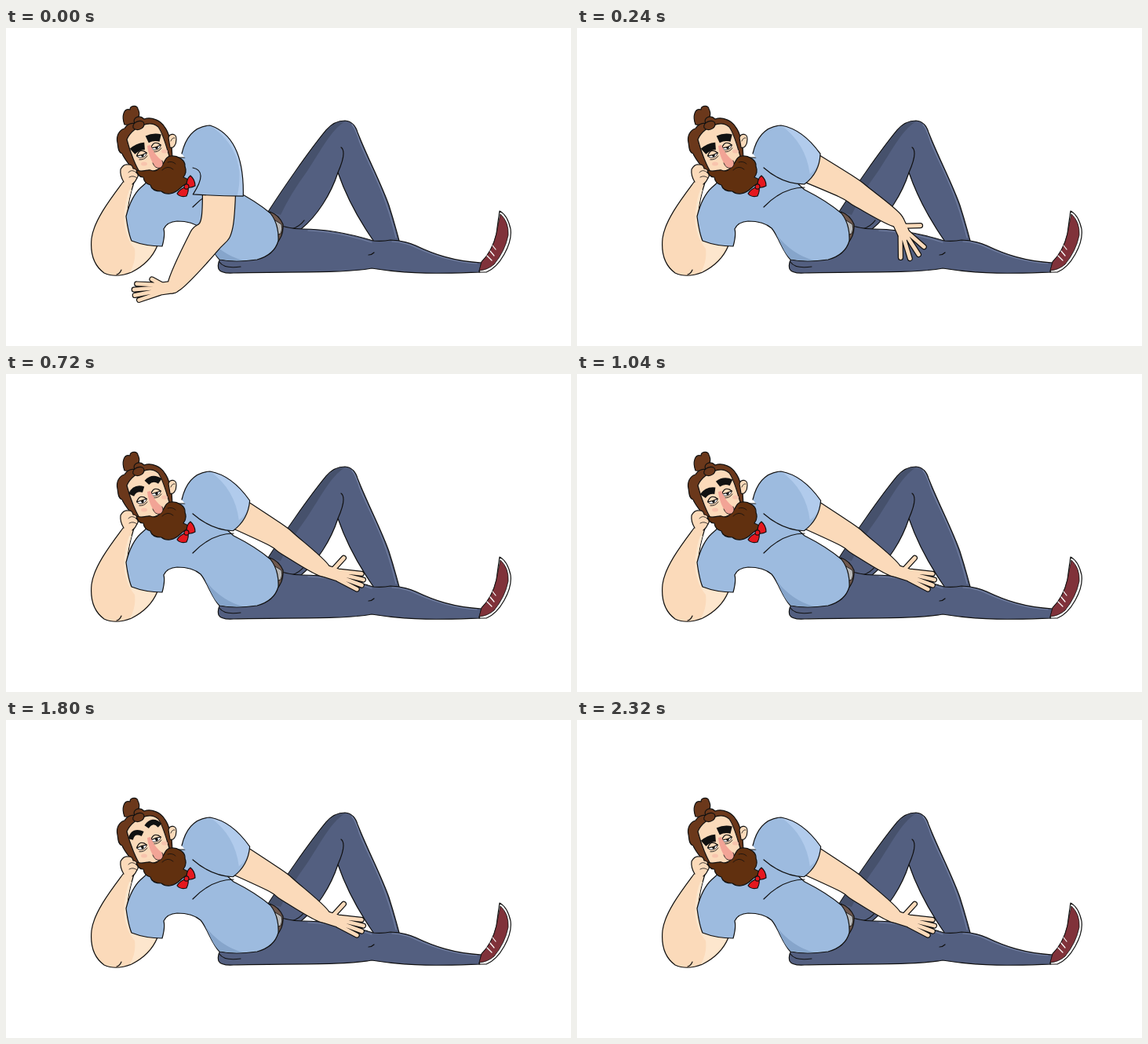
An HTML page that plays this animation: 720 by 405 pixels, repeating every 2.84 s.

```html
<!DOCTYPE html>
<html lang="en">
<head>
<meta charset="utf-8">
<title>Lounging man</title>
<style>
  html, body { margin: 0; width: 100%; height: 100%; overflow: hidden; background: #fff; }
  svg { display: block; width: 720px; height: 405px; }
  path, ellipse { stroke: #111; stroke-width: 1.2; stroke-linejoin: round; stroke-linecap: round; }
  .plain path, .plain ellipse, path.plain { stroke: none; }
  path.line { fill: none; }
  .thin { stroke-width: .8; }
  .denim { fill: #535f80; }
  .skin { fill: #fbdaba; }
  .pale { fill: #fde6cd; }
  .shirt { fill: #9dbbdf; }
  .light { fill: #b1cbec; }
  .hair { fill: #6b381b; }
  .beard { fill: #61300f; }
  .red { fill: #e5181f; }
  path.glow { fill: none; stroke: #7481a3; }
  path.hand { fill: none; stroke: #fbdaba; }
  path.rim { fill: none; stroke: #111; }
  path.brow { fill: none; stroke-linecap: butt; }
</style>
</head>
<body>
<svg viewBox="0 0 720 405">
  <defs>
    <g id="eye">
      <ellipse rx="6.3" ry="4" fill="#fff" class="thin"/>
      <ellipse cx=".5" cy="1.4" rx="1.2" ry="1.4" fill="#111"/>
      <path id="lid" class="skin"/>
      <path class="line thin" d="M-5,5.5Q1,8 6,4"/>
    </g>
    <path id="brow" class="brow"/>
  </defs>

  <!-- legs -->
  <path class="denim" d="M334,234C352,206 385,158 408,130Q418,118 432,118Q444,119 448,133C462,168 478,198 488,226Q495,248 501,271L469,272C455,252 436,222 423,184C414,212 396,240 376,256L350,262Q344,246 334,234Z"/>
  <path class="plain" fill="#46516c" d="M335,234C352,207 385,159 408,131Q418,119 432,119C414,130 402,155 384,182Q362,212 350,238Z"/>
  <path class="line" d="M423,184Q430,168 430,160Q430,154 427,152M380,245Q374,253 364,256"/>
  <path class="glow" d="M441,123Q446,129 451,146C466,182 482,205 497,267"/>
  <path class="denim" d="M345,250Q362,256 378,256C410,256 445,264 468,271Q480,272 490,270Q505,270 522,277C545,288 570,297 606,299L604,311C570,312 520,315 466,306C430,313 350,310 290,312Q274,313 271,307Q269,300 273,294Z"/>
  <path class="glow" d="M385,258C415,259 440,265 466,273M492,272Q506,272 521,279C545,290 570,298 600,300"/>
  <path class="line" d="M462,289Q466,289 469,286M272,298Q278,307 299,304"/>

  <!-- shoe -->
  <path fill="#fff" d="M603,311L606,298Q620,284 625,262Q627,246 629,233Q639,238 643,256Q645,270 635,288Q625,306 612,311Z"/>
  <path fill="#80323a" class="thin" d="M603,309L606,298Q620,284 625,262Q627,250 630,237Q641,247 640,264Q636,284 622,301Q614,308 603,309Z"/>
  <path class="line" d="M613,290L619,296M617,284L622,290M620,277L624,282" style="stroke:#fff"/>

  <!-- belt -->
  <path fill="#6f584e" d="M336,234Q348,238 353,250Q354,264 345,274L338,270Z"/>
  <path fill="#b9b9b9" class="thin" d="M343,245L351,250Q353,256 350,262L343,264Z"/>

  <!-- propping arm -->
  <path class="skin" d="M150,195C136,214 112,244 109,268Q106,298 125,312Q140,319 160,311Q184,299 193,277L165,272Q152,256 154,240Q156,218 163,197Z"/>
  <path class="pale plain" d="M157,206C147,235 148,262 164,281Q166,297 158,311Q182,298 191,278L165,272Q152,256 154,240Q155,222 160,206Z"/>
  <path class="line" d="M141,314Q145,313 147,308"/>

  <!-- torso -->
  <path class="shirt" d="M172,203C162,212 156,228 153,240Q156,262 160,271Q178,278 199,278Q203,264 201,256Q205,247 218,246Q238,246 248,255C256,264 262,285 272,295Q292,299 320,295Q342,289 347,271Q348,250 337,236Q318,220 290,206L245,165L215,165Z"/>
  <path class="plain" fill="#86a5cb" d="M251,259C258,268 262,285 272,294Q286,297 302,296Q272,288 251,259Z"/>
  <path class="line" d="M290,203Q262,203 238,228"/>

  <!-- swinging arm -->
  <path id="handRim" class="rim"/>
  <path id="palmRim" class="rim"/>
  <path id="arm" class="skin"/>
  <path id="palm" class="hand"/>
  <path id="hand" class="hand"/>
  <path id="sleeve" class="shirt plain"/>
  <path id="sleeveLight" class="light plain"/>
  <path id="sleeveLine" class="line"/>

  <!-- head -->
  <path class="hair" d="M151,123C147,112 150,102 158,104C158,98 168,98 168,103C172,110 168,118 162,124Z"/>
  <path class="hair" d="M165,184C155,172 150,165 148,160C142,158 143,150 142,146C140,138 144,130 151,128C156,120 164,121 164,122C160,114 170,110 176,116C186,112 198,119 202,126C208,133 208,140 211,150L212,166L180,186Z"/>
  <path class="skin" d="M207,140C208,133 218,134 217,142C217,149 213,154 209,152Z"/>
  <path class="line thin" d="M210,144Q212,139 215,140"/>
  <path class="skin" d="M154,142C158,132 168,126 174,124Q186,119 194,126C200,134 204,150 208,163L196,180L172,186C166,178 158,158 154,142Z"/>
  <path class="hair" d="M162,127C160,119 175,115 176,122C176,129 166,132 162,127Z"/>
  <g class="plain" fill="#f8c4ad">
    <ellipse cx="176" cy="173" rx="4" ry="2.5"/>
    <ellipse cx="202" cy="157" rx="4" ry="2.5"/>
  </g>
  <use href="#eye" transform="translate(173 161) rotate(-18)"/>
  <use href="#eye" transform="translate(191 151) rotate(-18)"/>
  <use href="#brow" transform="translate(168 152) rotate(-24)"/>
  <use href="#brow" transform="translate(188 139) rotate(-6)"/>
  <path class="beard" d="M166,181C174,184 180,180 184,181Q190,184 196,178C203,172 202,164 210,163C218,162 229,168 228,176Q231,184 226,190Q236,194 232,197Q226,200 222,204C214,212 204,213 198,208Q186,208 184,200Q176,198 175,190Q168,190 166,181Z"/>
  <path class="line thin" d="M199,181Q206,174 213,180M206,171Q212,169 216,173"/>
  <path class="plain" fill="#f2a496" d="M180,150C181,160 185,168 187,172Q190,180 197,178Q202,174 199,169C193,165 188,158 184,149Z"/>
  <path class="line thin" d="M187,172Q190,180 197,178Q202,174 199,169"/>
  <path class="skin" d="M150,196Q145,188 146,180Q150,173 155,174Q161,173 162,179Q168,180 166,184Q170,187 167,191Q165,196 161,199"/>
  <path class="line thin" d="M156,184Q160,179 166,184M157,190Q162,187 167,191"/>

  <!-- bow tie -->
  <path class="red" d="M230,200Q230,192 235,188Q241,193 241,201Q236,204 231,203Z"/>
  <path class="red" d="M230,202Q221,205 218,211Q222,216 230,214Q233,208 232,204Z"/>
  <ellipse class="red" cx="230" cy="202" rx="3" ry="3.2"/>
</svg>
<script>
const LOOP = 2840, STEP = 40, LAST = 2320;
const SHOULDER = [272, 165];
const $ = id => document.getElementById(id);
const setPath = (id, d) => $(id).setAttribute('d', d);

const mix = (a, b, k) => a + (b - a) * k;
const mixPoint = (p, q, k) => [mix(p[0], q[0], k), mix(p[1], q[1], k)];
const clamp = k => Math.max(0, Math.min(1, k));
const progress = (t, from, to) => clamp((t - from) / (to - from));
const ease = (t, from, to) => {
  const k = progress(t, from, to);
  return k * k * (3 - 2 * k);
};
const hump = (t, from, to) => Math.sin(Math.PI * progress(t, from, to));

// Point at a distance from p, in degrees clockwise from the right.
const step = (p, angle, length) => {
  const a = angle * Math.PI / 180;
  return [p[0] + length * Math.cos(a), p[1] + length * Math.sin(a)];
};

// Smooth open curve through points.
function curve(p) {
  const at = i => p[Math.max(0, Math.min(p.length - 1, i))];
  let d = 'M' + p[0];
  for (let i = 1; i < p.length; i++) {
    const [a, b, c, e] = [at(i - 2), at(i - 1), at(i), at(i + 1)];
    const c1 = [b[0] + (c[0] - a[0]) / 6, b[1] + (c[1] - a[1]) / 6];
    const c2 = [c[0] - (e[0] - b[0]) / 6, c[1] - (e[1] - b[1]) / 6];
    d += `C${c1} ${c2} ${c}`;
  }
  return d;
}

function drawStroke(id, d, width) {
  for (const [name, extra] of [[id, 0], [id + 'Rim', 2.4]]) {
    const path = $(name);
    path.setAttribute('d', d);
    path.style.strokeWidth = width + extra;
  }
}

function drawArm(swing, settle) {
  const upper = mix(92, 29, swing), fore = mix(124, 36, swing);
  const elbow = step(SHOULDER, upper, mix(82, 79, swing));
  const foreLength = mix(100, 81, swing);
  const wrist = step(elbow, fore, foreLength);
  const bulge = step(elbow, fore, foreLength * .3);
  const joints = [
    [SHOULDER, upper, 22],
    [elbow, (upper + fore) / 2, mix(21, 16, swing)],
    [bulge, fore, mix(21, 15, swing)],
    [wrist, fore, 8.5]
  ];
  const side = turn => joints.map(([p, angle, half]) => step(p, angle + turn, half));
  setPath('arm', curve([...side(-90), ...side(90).reverse()]));

  const aim = 172 - 104 * swing - 51 * settle;
  const knuckles = step(wrist, aim, 19);
  const spread = 7 + 9 * hump(swing - settle, 0, 2);
  let fingers = '';
  for (let i = -1.5; i < 2; i++) {
    const root = step(knuckles, aim + 90, i * 3.6);
    const tip = step(root, aim + i * spread, 33 - 4 * Math.abs(i));
    fingers += `M${root}L${tip}`;
  }
  const thumb = aim + mix(28, -52, swing);
  fingers += `M${step(wrist, aim, 7)}L${step(wrist, thumb, 29)}`;
  drawStroke('palm', `M${wrist}L${knuckles}`, 14.5);
  drawStroke('hand', fingers, 4.8);
  drawSleeve(upper, swing);
}

function drawSleeve(angle, swing) {
  const cuff = step(SHOULDER, angle, mix(48, 32, swing));
  const half = mix(32, 22, swing);
  const outer = step(cuff, angle - 90, half), inner = step(cuff, angle + 90, half);
  const hem = step(cuff, angle, mix(1, 10, swing));
  const crown = mixPoint([304, 139], [288, 129], swing);
  const fold = mixPoint([258, 182], [262, 199], swing);
  const outline = `M224,160Q232,126 260,124Q${crown} ${outer}Q${hem} ${inner}Q${fold} 238,178`;
  setPath('sleeve', outline);
  setPath('sleeveLine', outline);
  const seam = mixPoint(outer, inner, mix(.12, .65, swing));
  setPath('sleeveLight', `M260,124Q${crown} ${outer}Q${mixPoint(outer, hem, .7)} ${seam}Q${[crown[0] + 4, crown[1] + 18]} 260,124Z`);
}

function drawFace(raise) {
  const end = 2 - 9 * raise;
  setPath('brow', `M-8.5,${end}Q0,${-1 - 20 * raise} 8.5,${end}`);
  $('brow').style.strokeWidth = mix(9.5, 5, raise);
  setPath('lid', `M-6.6,0Q0,-9.5 6.6,0Q0,${mix(1.5, -2.5, raise)} -6.6,0Z`);
}

// Three brow wiggles, then a slow fall.
function browRaise(t) {
  const floor = .2 * progress(t, 640, 840);
  const wave = (1 - Math.cos(2 * Math.PI * (t - 640) / 400)) / 2;
  if (t < 640) return 0;
  return t < 1640 ? mix(floor, 1, wave) : (1 - progress(t, 1640, LAST)) ** 1.6;
}

function draw(t) {
  const swing = ease(t, 80, 240) - .13 * hump(t, 0, 160) + .03 * hump(t, 160, 400);
  drawArm(swing, ease(t, 240, 400));
  drawFace(browRaise(t));
}

function tick(now) {
  draw(Math.min(LAST, Math.floor(now % LOOP / STEP) * STEP));
  requestAnimationFrame(tick);
}
draw(0);
requestAnimationFrame(tick);
</script>
</body>
</html>
```
